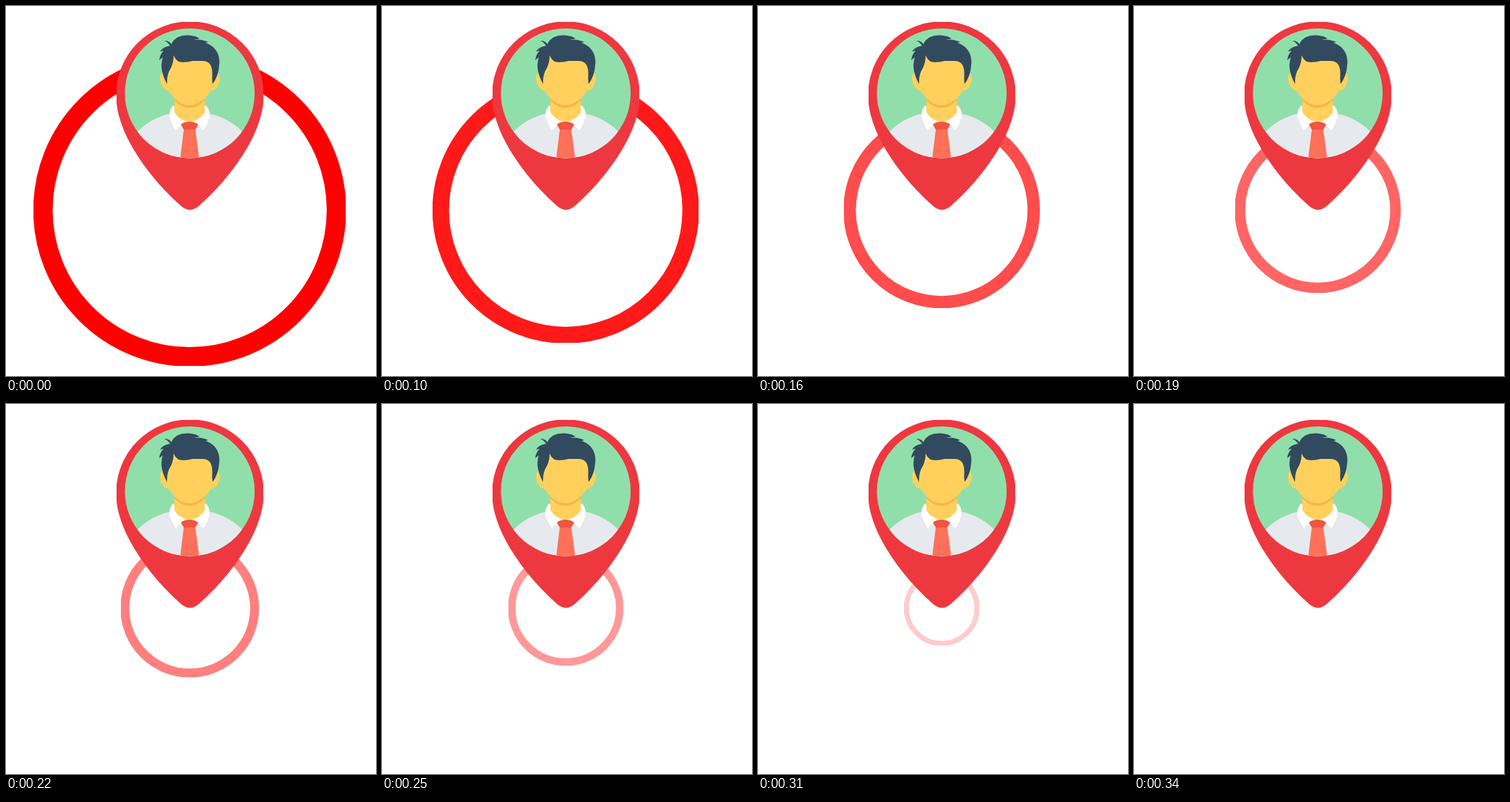
These frames come from a looping animation (512 by 512 pixels, 0.37 s). An HTML page:

```html
<!DOCTYPE html>
<html lang="en">
<head>
<meta charset="utf-8">
<title>Location pulse</title>
<style>
  html, body { margin: 0; width: 100%; height: 100%; overflow: hidden; background: #fff; }
  svg { position: absolute; left: 0; top: 0; width: 512px; height: 512px; }
</style>
</head>
<body>
<svg id="pulse" viewBox="0 0 512 512">
  <circle id="ring" cx="254.2" cy="282.4" r="202.5" fill="none" stroke="#f00" stroke-width="27"/>
</svg>

<svg viewBox="0 0 512 512">
  <clipPath id="bounds"><path d="M153 22H356V282H153Z"/></clipPath>
  <clipPath id="badge"><circle cx="254.3" cy="120.7" r="89.8"/></clipPath>
  <path clip-path="url(#bounds)" fill="#ee3840" stroke="#ee3840" stroke-width="1.4" d="M153 123C153 180 205 243 243 276.5Q254.5 286 266 276.500C304 243 356 180 356 123A101.5 101 0 0 0 153 123Z"/>
  <g clip-path="url(#badge)">
    <path fill="#90dfaa" d="M160 26H350V216H160Z"/>
    <!-- shirt and collar -->
    <path fill="#e6e9ee" d="M176 180Q200 153 230 149H279Q309 153 333 180V216H176Z"/>
    <path fill="#fff" d="M231 138Q226 144 226 151Q228 162 235 172L246 161H262L273 172Q280 162 282 151Q282 144 277 138Z"/>
    <!-- neck -->
    <path fill="#ffd15c" d="M233 122H275V147Q268 159 254 160Q240 159 233 147Z"/>
    <path fill="#f9b54c" d="M233 127Q243 137 254 137T275 127V131Q265 141 254 141T233 131Z"/>
    <!-- tie -->
    <path fill="#f1543f" d="M242 164Q247 160 254 160T266 164L262 171H246Z"/>
    <path fill="#ff7058" d="M246 171H262L267.500 212H241Z"/>
    <!-- head -->
    <path fill="#ffd15c" d="M225 92Q213 89 213 101Q215 117 228 118ZM284 92Q296 89 296 101Q294 117 281 118Z"/>
    <path fill="#ffd15c" d="M222 105Q222 82 226 64H278Q286 76 287 105C286 122 268 137 254 137S223 122 222 105Z"/>
    <path fill="#324a5e" d="M223 108C216 95 213 84 217 71L212 75Q213 67 218 62L213 63Q218 56 227 55Q224 50 219 48Q226 48 229 53C232 43 245 39 257 41Q264 42 268 45L259 47Q270 45 280 50L276 51C290 55 297 68 295 82Q294 97 286 108C284 100 287 92 284 84Q281 75 270 76Q264 76 258 76Q246 79 239 77Q234 74 232 68Q232 78 228 86Q222 95 223 108Z"/>
  </g>
</svg>

<script>
  const LOOP = 370, CX = 254.2, CY = 282.4, SIZE = 512;
  const radii = [215.5, 183.5, 157.5, 135, 114, 95, 79, 64.5, 51.5, 0];

  const steps = radii.map((radius, i) => ({
    radius,
    alpha: radius ? 1 - i / 10 : 0,
    offset: i ? (70 + 30 * i) / LOOP : 0
  }));
  steps.push({ ...steps[steps.length - 1], offset: 1 });

  const play = (id, style) => document.getElementById(id).animate(
    steps.map(s => ({ offset: s.offset, easing: 'steps(1, end)', ...style(s) })),
    { duration: LOOP, iterations: Infinity }
  );

  // The ring is trimmed by its bounding square, leaving slightly flat sides.
  play('pulse', ({ radius: r, alpha }) => ({
    opacity: alpha,
    clipPath: `inset(${CY - r}px ${SIZE - CX - r}px ${SIZE - CY - r}px ${CX - r}px)`
  }));
  play('ring', ({ radius: r }) => ({
    r: `${r * 0.94 + 0.5}px`,
    strokeWidth: `${r * 0.12 + 1}px`
  }));
</script>
</body>
</html>
```
